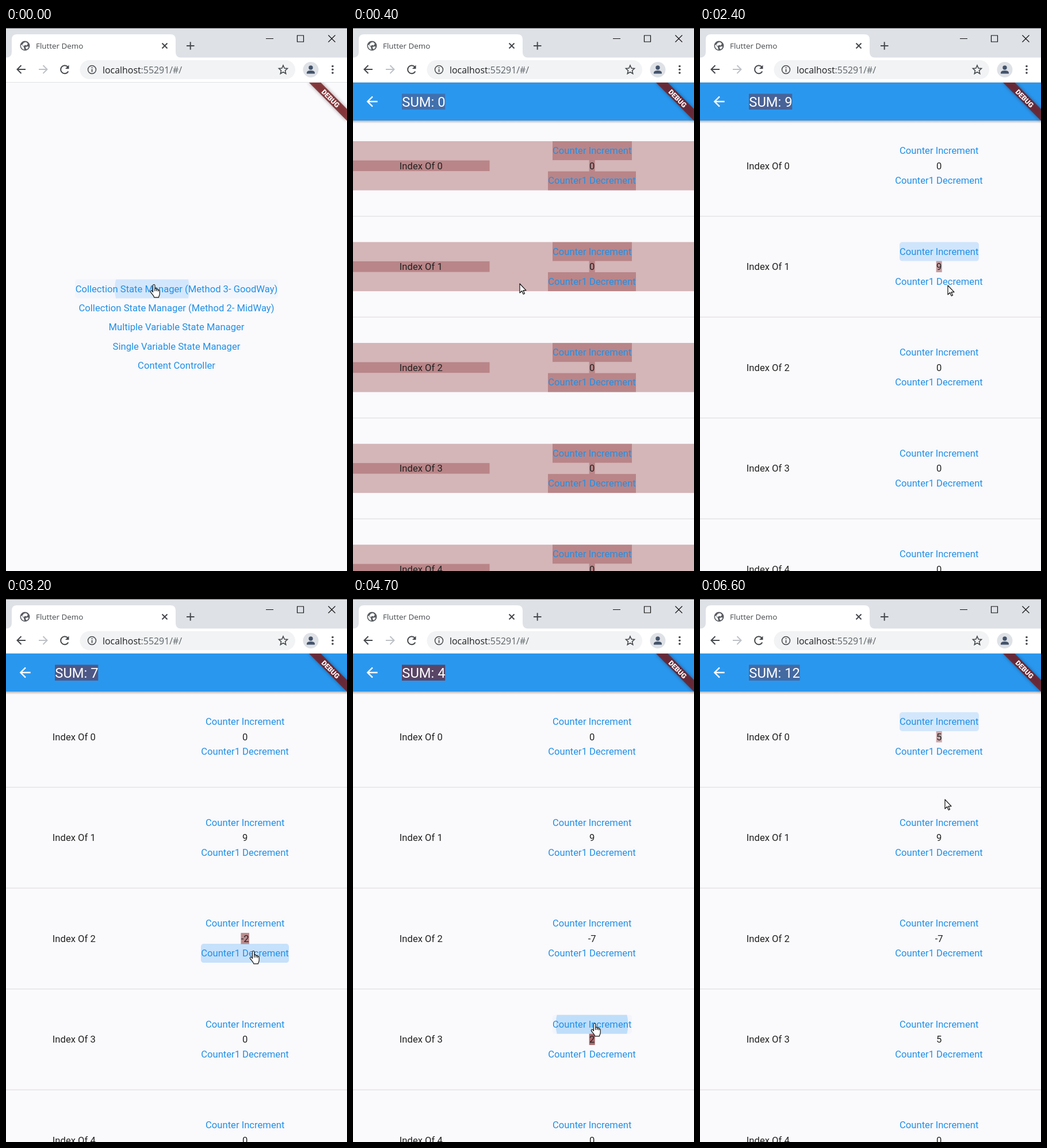
An HTML page that plays this animation: 593x945 px, repeating every 6.7 s.

```html
<!DOCTYPE html>
<html lang="en">
<head>
<meta charset="utf-8">
<title>Flutter Demo</title>
<style>
html, body { margin: 0; width: 100%; height: 100%; overflow: hidden; background: #faf9fc; }
svg { display: block; }
text { font: 16.63px Roboto, sans-serif; fill: #222; }
.mid { text-anchor: middle; }
.link { fill: #2190e6; }
.title { font-size: 23.76px; fill: #fff; }
.ui { font: 13.4px "Open Sans", sans-serif; fill: #45484c; }
.url { font-size: 15.9px; fill: #5f6368; }
.url tspan { fill: #202124; }
.debug { font-size: 12.1px; font-weight: 900; fill: #fff; }
.line { fill: none; stroke: #45484c; stroke-width: 2; }
.thin { fill: none; stroke: #111; stroke-width: 1.2; }
</style>
</head>
<body>
<svg width="593" height="945" viewBox="0 0 593 945">
  <defs>
    <linearGradient id="shade" x2="0" y2="1">
      <stop stop-opacity=".28"/><stop offset="1" stop-opacity="0"/>
    </linearGradient>
    <filter id="blur"><feGaussianBlur stdDeviation="3"/></filter>
    <clipPath id="view"><path d="M0 95H593V945H0z"/></clipPath>
  </defs>

  <g clip-path="url(#view)">
    <g id="app"></g>
    <g id="banner">
      <path d="M526 94h21l46 47v21z" opacity=".35" filter="url(#blur)"/>
      <path d="M526 94h20.5l46.500 47v20.500z" fill="#7a191d" opacity=".8"/>
      <text class="debug mid" transform="translate(564.4 122.600) rotate(45)" y="4.300">DEBUG</text>
    </g>
  </g>

  <!-- browser frame -->
  <path d="M0 0H593V52H0z" fill="#dee1e6"/>
  <path d="M0 0H593V1H0z" fill="#6b6d70"/>
  <path d="M0 51.500Q10 51.500 10 42V20q0-9 9-9H286q9 0 9 9V42q0 9.500 9.500 9.500H593V94H0z" fill="#fff"/>
  <path d="M0 94H593v1H0z" fill="#dfe1e4"/>
  <circle cx="33" cy="31" r="8.500" fill="#585c60"/>
  <path d="M27 29l4 4 1 5q-6-2-6-8zM31 25.500l4-1 3 3-2 3-3-1-2 2-3-2zM34 33l4-1 1.500 1-3 4-2-1z" fill="#fff"/>
  <text class="ui" x="52" y="36">Flutter Demo</text>
  <path class="line" d="M271.500 26.500l9 9m0-9l-9 9M314 31h13.500M320.700 24.300v13.500"/>
  <path class="thin" d="M452 18.500h13M506.500 13h11v11h-11zM560.500 12.500l12 12m0-12l-12 12"/>
  <path class="line" d="M34 72H20m6.500-7l-7 7 7 7"/>
  <path class="line" d="M57 72H71m-6.500-7l7 7-7 7" style="stroke:#bdc1c6"/>
  <path class="line" d="M108.300 75.500A7 7 0 1 1 107.300 67.500"/>
  <path d="M109.500 64.500v6.500h-6.500z" fill="#45484c"/>
  <rect x="128.500" y="56" width="374.500" height="33" rx="16.500" fill="#f1f3f4"/>
  <circle class="line" cx="149.500" cy="72.500" r="7" style="stroke-width:1.5"/>
  <path d="M148.700 71.500h1.700v5h-1.700zM148.700 68.300h1.700v1.800h-1.700z" fill="#45484c"/>
  <text class="ui url" x="168" y="78.500"><tspan>localhost</tspan>:55291/#/</text>
  <path class="line" style="stroke-width:1.6" d="M482 65l2.200 5 5.300.5-4 3.600 1.200 5.400-4.700-2.900-4.700 2.900 1.200-5.400-4-3.600 5.300-.5z"/>
  <circle cx="530" cy="72.500" r="13.500" fill="#dee1e6"/>
  <circle cx="530" cy="69" r="3.700" fill="#43536b"/>
  <path d="M523 79.500v-1.500q0-4 7-4t7 4v1.500z" fill="#43536b"/>
  <g fill="#45484c">
    <circle cx="568" cy="66.500" r="1.800"/><circle cx="568" cy="72.300" r="1.800"/><circle cx="568" cy="78.100" r="1.800"/>
  </g>

  <g id="cursor" stroke="#111" stroke-width="1.200" stroke-linejoin="round" fill="#fff"></g>
</svg>

<script>
const LOOP = 6700, STEP = 100, PITCH = 175.55, MOUNT = 100, FLASH = 550;
const app = document.getElementById('app'), cursor = document.getElementById('cursor');

const links = ['Collection State Manager (Method 3- GoodWay)', 'Collection State Manager (Method 2- MidWay)',
  'Multiple Variable State Manager', 'Single Variable State Manager', 'Content Controller'];

// bursts of button presses, in ms
const bursts = [
  { row: 1, sign: 1, from: 800, to: 2190, n: 9, leave: 2300 },
  { row: 2, sign: -1, from: 2800, to: 3690, n: 7, leave: 3800 },
  { row: 3, sign: 1, from: 4400, to: 5130, n: 5, leave: 5150 },
  { row: 0, sign: 1, from: 5650, to: 6345, n: 5, leave: 6400 }
];

// pointer stops: time, x, y
const path = [[0, 257, 446], [150, 257, 446], [200, 266, 449], [400, 290, 445], [700, 419, 389], [2300, 419, 389],
  [2400, 431, 448], [2650, 430, 612], [3800, 430, 612], [4000, 430, 600], [4300, 420, 738], [5150, 420, 738],
  [5400, 370, 189], [5550, 415, 210], [6400, 415, 210], [6600, 426, 349], [LOOP, 426, 349]];

const ARROW = 'M0 0v16l3.700-3.500 2.500 5.800 2.300-1-2.500-5.600h5z';
const HAND = 'M5 13.500V2.200a1.700 1.700 0 0 1 3.400 0v6.300l.2-.8a1.600 1.600 0 0 1 2.800.6v.6a1.600 1.600 0 0 1 2.700.8v.7' +
  'a1.500 1.500 0 0 1 2.600 1v5c0 3-1.500 4-1.800 6.500H7.200C6.500 19.500 3 16.500 1 13.600a1.600 1.600 0 0 1 2.400-2z';

const clamp = v => Math.max(0, Math.min(1, v));
const rect = (x, y, w, h, fill, extra = '') =>
  `<rect x="${x}" y="${y}" width="${w}" height="${h}" fill="${fill}" ${extra}/>`;
const label = (x, y, s, cls) => `<text x="${x}" y="${y}" class="${cls}">${s}</text>`;
const flash = (x, y, w, h, a) => a > 0 ? rect(x, y, w, h, '#761416', `opacity="${a}"`) : '';
const flashAt = age => age < 0 ? 0 : .65 * clamp(1 - age / FLASH);

// ink on a button: pale hover plus a circle spreading from the press
function ink(id, x, y, w, hover, cx, radius, alpha) {
  const box = `x="${x}" y="${y}" width="${w}" height="33" rx="4.700"`;
  return `<clipPath id="${id}"><rect ${box}/></clipPath>` +
    (hover ? `<rect ${box} fill="#2196f3" opacity=".035"/>` : '') +
    `<circle cx="${cx}" cy="${y + 16.5}" r="${radius}" fill="#2196f3" opacity="${alpha}" clip-path="url(#${id})"/>`;
}

function pressState(b, t) {
  const times = Array.from({ length: b.n }, (_, k) => b.from + (b.to - b.from) * (k / (b.n - 1)) ** .7);
  const done = times.filter(v => v <= t);
  return { count: done.length * b.sign, age: done.length ? t - done[done.length - 1] : -1 };
}

function menu(t) {
  return ink('inkMenu', 120, 437.5, 353, true, 254, 65 + t * .4, .15) +
    links.map((s, i) => label(296.5, 460 + i * 33.2, s, 'mid link')).join('');
}

function listRow(i, t, mount) {
  const b = bursts.find(v => v.row === i);
  const { count, age } = b ? pressState(b, t) : { count: 0, age: -1 };
  const w = count < 0 ? 14.5 : 10;
  let s = flash(0, 197, 593, 85.5, mount) + flash(0, 230.5, 237.5, 18.5, mount) +
    flash(347, 197, 138, 33, mount) + flash(339, 249.5, 153, 33, mount) +
    flash(415.7 - w / 2, 230, w, 19.5, Math.max(mount, flashAt(age)));
  if (b && t >= b.from - 100) {
    const [x, y, bw] = b.sign > 0 ? [347, 197, 138] : [339, 249, 153];
    s += ink('ink' + i, x, y, bw, t < b.leave, 415.5, Math.max(0, (t - b.from) * .21),
      age < 0 ? 0 : .25 * clamp(1 - age / 950));
  }
  s += label(118.3, 245.5, 'Index Of ' + i, 'mid') + label(415.7, 219, 'Counter Increment', 'mid link') +
    label(415.7, 245.5, count, 'mid') + label(415.5, 271.3, 'Counter1 Decrement', 'mid link') +
    rect(0, 327, 593, 1.2, '#dfdee1');
  return `<g transform="translate(0 ${i * PITCH})">${s}</g>`;
}

function listPage(t) {
  const mount = flashAt(t - MOUNT);
  const states = bursts.map(b => pressState(b, t));
  const sum = states.reduce((n, v) => n + v.count, 0);
  const glow = Math.max(mount, ...states.map(v => flashAt(v.age)));
  const p = clamp(t / 222);
  return `<g opacity="${p ** 1.6}" transform="translate(0 ${212 * (1 - p) ** 2})">` +
    rect(0, 95, 593, 850, '#faf9fc') +
    [0, 1, 2, 3, 4].map(i => listRow(i, t, mount)).join('') +
    rect(0, 161, 593, 5, 'url(#shade)') + rect(0, 95, 593, 66, '#2a97ee') +
    flash(85, 114.5, 61.9 + 13.34 * String(sum).length, 27.5, glow) +
    label(85.3, 136.5, 'SUM: ' + sum, 'title') +
    '<path transform="translate(18.900 113.700) scale(1.188)" fill="#fff" ' +
    'd="M20 11H7.830l5.590-5.590L12 4l-8 8 8 8 1.410-1.410L7.830 13H20z"/></g>';
}

function pointer(t) {
  const i = path.findLastIndex(k => k[0] <= t);
  const [t0, x0, y0] = path[i], [t1, x1, y1] = path[i + 1];
  const p = (t - t0) / (t1 - t0), e = p * p * (3 - 2 * p);
  const hand = x0 === x1 && y0 === y1 && t1 < LOOP;
  const x = x0 + (x1 - x0) * e - (hand ? 6.5 : 0), y = y0 + (y1 - y0) * e;
  return `<path transform="translate(${x} ${y})" d="${hand ? HAND : ARROW}"/>` +
    (hand ? `<path transform="translate(${x} ${y})" fill="none" d="M8.400 8.500v3.500M11.400 9v3M14.100 10v2.500"/>` : '');
}

let last = -1;
function draw() {
  const t = Math.floor(performance.now() % LOOP / STEP) * STEP;
  if (t !== last) {
    last = t;
    app.innerHTML = (t < 300 ? menu(t) : '') + (t > 0 ? listPage(t) : '');
    cursor.innerHTML = pointer(t);
  }
  requestAnimationFrame(draw);
}
draw();
</script>
</body>
</html>
```
